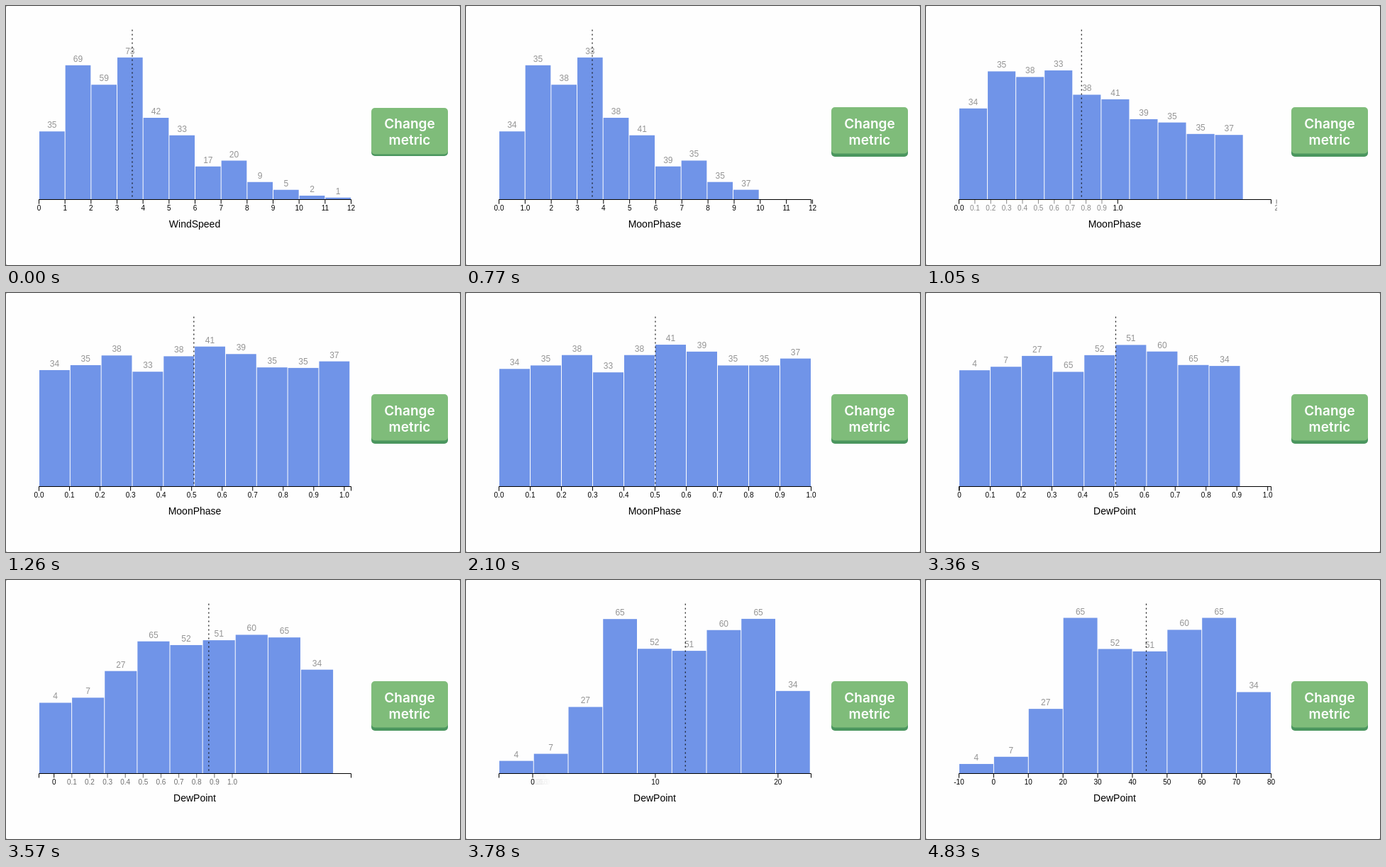
These frames come from a looping animation (640 by 366 pixels, 4.9 s). An HTML page with a canvas:

```html
<!DOCTYPE html>
<html lang="en">
<head>
<meta charset="utf-8">
<title>Histogram</title>
<style>
  html, body { margin: 0; width: 100%; height: 100%; overflow: hidden; background: #fefefe; }
  canvas { display: block; width: 640px; height: 366px; }
</style>
</head>
<body>
<canvas id="stage"></canvas>
<script>
const W = 640, H = 366, LOOP = 4900, STEP = 70, MORPH = 635;
const LEFT = 46.5, BASE = 273.5, PLOT_W = 440, PLOT_H = 220;
const SANS = '"Liberation Sans", Arial, sans-serif';
const UI = 'Inter, "Liberation Sans", sans-serif';

const range = (lo, n, f) => Array.from({ length: n }, (_, i) => f(lo + i));

const metrics = [
  { name: 'WindSpeed', lo: 0, hi: 12, top: 80, mean: 3.586,
    counts: [35, 69, 59, 73, 42, 33, 17, 20, 9, 5, 2, 1],
    ticks: range(0, 13, v => v), format: String },
  { name: 'MoonPhase', lo: 0, hi: 1, top: 45, mean: 0.501,
    counts: [34, 35, 38, 33, 38, 41, 39, 35, 35, 37],
    ticks: range(0, 11, v => v / 10), format: v => v.toFixed(1) },
  { name: 'DewPoint', lo: -10, hi: 80, top: 65, mean: 44,
    counts: [4, 7, 27, 65, 52, 51, 60, 65, 34],
    ticks: range(-1, 10, v => v * 10), format: String }
];
const clicks = [740.3, 3267.2];

const canvas = document.getElementById('stage');
const ctx = canvas.getContext('2d');
const dpr = window.devicePixelRatio || 1;
canvas.width = W * dpr;
canvas.height = H * dpr;

const clamp = v => Math.max(0, Math.min(1, v));
const lerp = (a, b, e) => a + (b - a) * e;
const cubicInOut = t => t < 0.5 ? 4 * t ** 3 : 1 - 4 * (1 - t) ** 3;
const xOf = (m, v) => LEFT + PLOT_W * (v - m.lo) / (m.hi - m.lo);
const barH = (m, i) => PLOT_H * m.counts[i] / m.top;

function text(str, x, y, size, color, family = SANS) {
  ctx.font = `${size} ${family}`;
  ctx.fillStyle = color;
  ctx.fillText(str, x, y);
}

function line(...points) {
  ctx.beginPath();
  points.forEach(([x, y]) => ctx.lineTo(x, y));
  ctx.stroke();
}

function box(x, y, w, h, r, color) {
  ctx.beginPath();
  ctx.roundRect(x, y, w, h, r);
  ctx.fillStyle = color;
  ctx.fill();
}

function drawBars(from, to, e) {
  const w = lerp(PLOT_W / from.counts.length, PLOT_W / to.counts.length, e);
  to.counts.forEach((n, i) => {
    const x = LEFT + 0.5 + w * i;
    const h = lerp(barH(from, i), barH(to, i), e);
    ctx.fillStyle = '#7094e8';
    ctx.fillRect(x, BASE - h, w - 1, h);
    text(n, x + (w - 1) / 2, BASE - h - 5, '12px', '#949494');
  });
}

function drawAxis(from, to, e) {
  ctx.strokeStyle = '#000';
  ctx.lineWidth = 1;
  const right = LEFT + PLOT_W;
  line([LEFT, BASE + 6], [LEFT, BASE], [right, BASE], [right, BASE + 6]);

  const tick = (v, label, alpha) => {
    const x = lerp(xOf(from, v), xOf(to, v), e);
    ctx.globalAlpha = alpha;
    line([x, BASE], [x, BASE + 6]);
    text(label, x, BASE + 15.5, '10px', '#000');
  };
  // Leaving ticks fade out, arriving ones fade in, shared ones stay solid.
  if (e < 1) {
    from.ticks.filter(v => !to.ticks.includes(v))
      .forEach(v => tick(v, from.format(v), 1 - e));
  }
  to.ticks.forEach(v => tick(v, to.format(v), from.ticks.includes(v) ? 1 : e));
  ctx.globalAlpha = 1;
}

function drawMean(from, to, e) {
  const x = lerp(xOf(from, from.mean), xOf(to, to.mean), e);
  ctx.strokeStyle = '#111';
  ctx.lineWidth = 1.2;
  ctx.setLineDash([2, 4]);
  line([x, 33.5], [x, BASE]);
  ctx.setLineDash([]);
}

function drawButton(raise) {
  const y = 144 - raise;
  box(515, y + 5, 108, 63 + 2 * raise, 5, '#4b965f');
  box(515, y, 108, 65.5, 5, '#7fbc7a');
  text('Change', 569, 173 - raise / 2, '600 19px', '#fff', UI);
  text('metric', 569, 196 - raise / 2, '600 19px', '#fff', UI);
}

function draw(t) {
  ctx.setTransform(dpr, 0, 0, dpr, 0, 0);
  ctx.fillStyle = '#999';
  ctx.fillRect(0, 0, W, H);
  box(0, 0, W, H, 2, '#fefefe');
  ctx.textAlign = 'center';

  const shown = clicks.filter(c => t >= c).length;
  const to = metrics[shown];
  const from = metrics[Math.max(0, shown - 1)];
  const e = shown ? cubicInOut(clamp((t - clicks[shown - 1]) / MORPH)) : 1;

  ctx.save();
  ctx.beginPath();
  ctx.rect(0, 0, 495, H);
  ctx.clip();
  drawBars(from, to, e);
  drawAxis(from, to, e);
  drawMean(from, to, e);
  text(to.name, 266, 313, '14px', '#000');
  ctx.restore();

  drawButton(clamp((t - 70) / 490));
}

const start = performance.now();
function loop() {
  const t = (performance.now() - start) % LOOP;
  draw(Math.floor(t / STEP) * STEP);
  requestAnimationFrame(loop);
}
loop();
</script>
</body>
</html>
```
